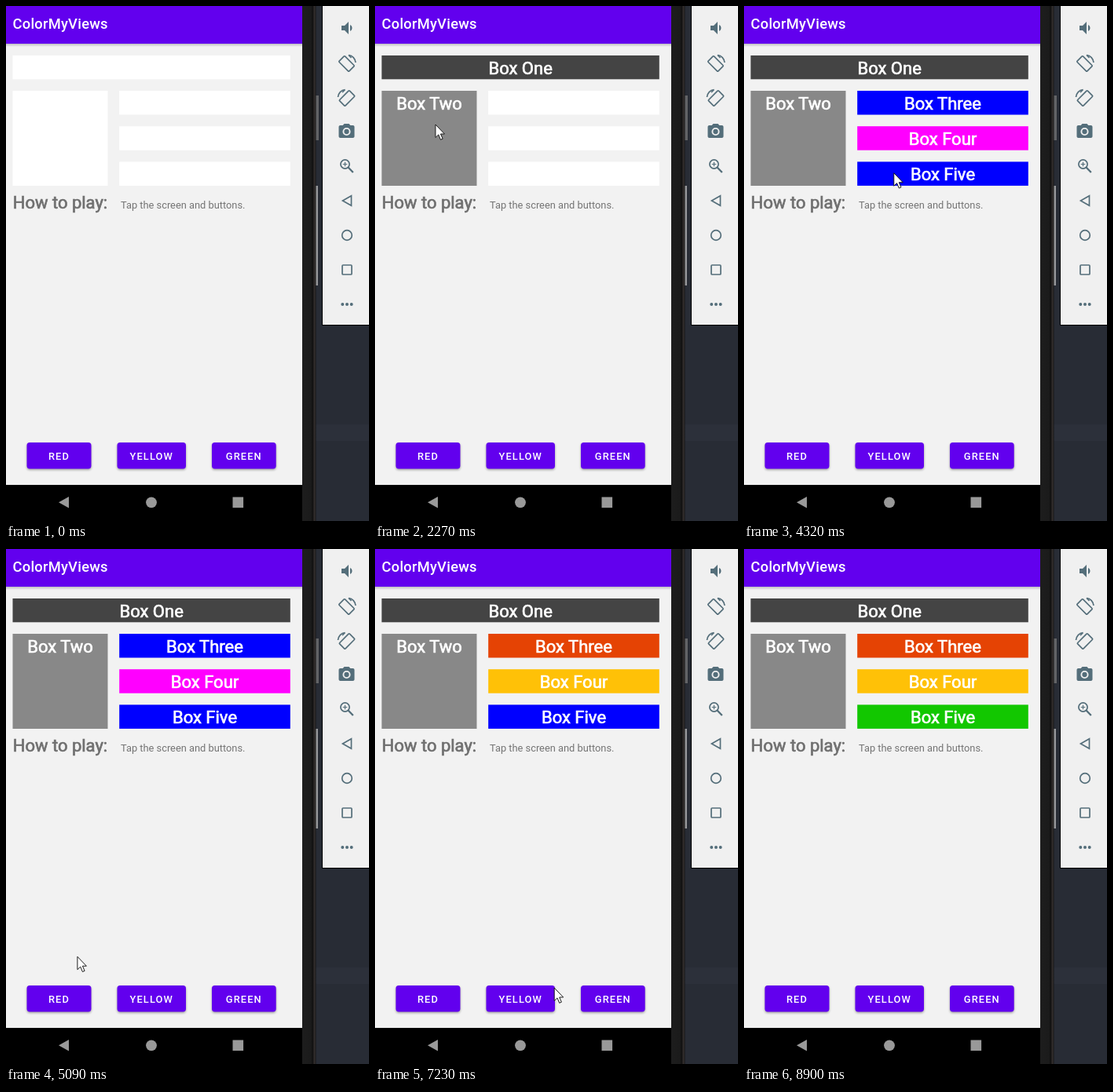
Animation, 462 px wide and 656 px high, one loop 9.31 s. Source, as an HTML page:

```html
<!DOCTYPE html>
<html lang="en">
<head>
<meta charset="utf-8">
<title>ColorMyViews</title>
<style>
  html, body { margin: 0; width: 100%; height: 100%; overflow: hidden; background: #282c35; }
  svg { display: block; width: 100vw; height: 100vh; font-family: Roboto, sans-serif; }
  .big { font-size: 22px; stroke-width: .7; }
  .label { fill: #fff; stroke: #fff; text-anchor: middle; }
  .caps { font-size: 12.83px; font-weight: 500; letter-spacing: 1.146px; fill: #fff; text-anchor: middle; }
  .line { fill: none; stroke: #546e7a; stroke-width: 1.7; }
  .solid { fill: #546e7a; }
</style>
</head>
<body>
<svg id="stage" viewBox="0 0 462 656">
  <defs>
    <linearGradient id="barShade" x2="0" y2="1">
      <stop offset="0" stop-color="#bdbdc2"/><stop offset="1" stop-color="#f2f2f2"/>
    </linearGradient>
    <linearGradient id="bezel">
      <stop offset="0" stop-color="#1d1d1d"/><stop offset=".65" stop-color="#1b1b1b"/>
      <stop offset=".75" stop-color="#0e0e0e"/><stop offset=".9" stop-color="#35302f"/>
      <stop offset="1" stop-color="#151515"/>
    </linearGradient>
    <filter id="soft" x="-20%" y="-40%" width="140%" height="190%"><feGaussianBlur stdDeviation="1.5"/></filter>
  </defs>

  <!-- editor behind the emulator -->
  <rect width="462" height="656" fill="#282c35"/>
  <rect x="394" y="533" width="68" height="21" fill="#2c303a"/>
  <rect x="394" y="114" width="4" height="57" fill="#626366"/>
  <rect x="394" y="229" width="3" height="127" fill="#96979a"/>

  <!-- phone -->
  <rect x="377" width="17.5" height="656" fill="url(#bezel)"/>
  <rect width="377" height="656" fill="#f2f2f2"/>
  <rect y="48" width="377" height="4" fill="url(#barShade)"/>
  <rect width="377" height="48" fill="#6200ee"/>
  <text x="8.5" y="29.3" font-size="18.35" font-weight="500" letter-spacing=".23" fill="#fff">ColorMyViews</text>
  <g id="boxes"></g>
  <text class="big" x="8.7" y="258" fill="#6f6f6f" stroke="#6f6f6f">How to play:</text>
  <text x="146" y="258" font-size="12.83" fill="#747474">Tap the screen and buttons.</text>
  <g id="buttons"></g>
  <rect y="610" width="377" height="46" fill="#000"/>
  <g fill="#999">
    <path d="M67 632.3L80 625v14.6z"/>
    <circle cx="185" cy="632.3" r="6.9"/>
    <rect x="288.5" y="625.5" width="13.6" height="13.6"/>
  </g>

  <!-- emulator toolbar -->
  <path d="M402 0h60v407h-60z" fill="#000"/>
  <path d="M403 0h59v406h-59z" fill="#f0f0f0"/>
  <g transform="translate(422 16)" class="solid">
    <path d="M5 9v6h4l5 5V4L9 9z"/>
    <path d="M16 8c1.5.7 2.5 2.200 2.500 4s-1 3.300-2.500 4z"/>
  </g>
  <g id="turn" class="line">
    <rect x="-9" y="-5.2" width="18" height="10.400" rx="1" transform="translate(433.500 73.500) rotate(45)"/>
    <path d="M436 62.500c5 .5 8.500 4.500 9 9.500M436 62.500l3.500 3.500"/>
  </g>
  <use href="#turn" transform="translate(867.500 44) scale(-1 1)"/>
  <g transform="translate(421.500 148)">
    <path class="solid" d="M9 2L7.200 4H4c-1.100 0-2 .9-2 2v12c0 1.100.9 2 2 2h16c1.100 0 2-.9 2-2V6c0-1.100-.9-2-2-2h-3.200L15 2z"/>
    <circle cx="12" cy="12" r="4.100" class="solid" stroke="#f0f0f0" stroke-width="1.900"/>
  </g>
  <g class="line">
    <circle cx="431.500" cy="201.500" r="5.600"/>
    <path d="M435.500 205.500l6.300 6.500" stroke-width="2.300"/>
    <path d="M428.700 201.500h5.600M431.500 198.700v5.600" stroke-width="1.200"/>
    <path d="M428.500 248l11-6.200v12.400z"/>
    <circle cx="434" cy="292" r="6.300"/>
    <rect x="428" y="330" width="12" height="12" rx="1"/>
  </g>
  <g class="solid">
    <circle cx="428.300" cy="380" r="2"/><circle cx="434" cy="380" r="2"/><circle cx="439.700" cy="380" r="2"/>
  </g>

  <path id="cursor" d="M0 0V16.500l3.800-3.600 2.700 6.400 2.700-1.200-2.700-6.100h5z" fill="#fff" stroke="#111" stroke-width=".95"/>
</svg>

<script>
const LOOP = 9310;
const $ = id => document.getElementById(id);

function add(parent, tag, attrs, text) {
  const el = document.createElementNS('http://www.w3.org/2000/svg', tag);
  for (const key in attrs) el.setAttribute(key, attrs[key]);
  if (text) el.textContent = text;
  return parent.appendChild(el);
}

// Each box lists its colour changes as [time, colour].
const boxes = [
  { name: 'Box One', x: 8.5, y: 63, w: 353.3, h: 30.3, fills: [[1380, '#444']] },
  { name: 'Box Two', x: 8.5, y: 108, w: 121, h: 121, fills: [[2200, '#888']] },
  { name: 'Box Three', x: 144.2, y: 108, w: 217.6, h: 30.5, fills: [[2950, '#00f'], [5840, '#e54304']] },
  { name: 'Box Four', x: 144.2, y: 153.2, w: 217.6, h: 30.5, fills: [[3710, '#f0f'], [6810, '#ffc107']] },
  { name: 'Box Five', x: 144.2, y: 198.4, w: 217.6, h: 30.5, fills: [[4180, '#00f'], [7780, '#12c700']] }
];

for (const b of boxes) {
  b.rect = add($('boxes'), 'rect', { x: b.x, y: b.y, width: b.w, height: b.h });
  b.label = add($('boxes'), 'text', { class: 'big label', x: b.x + b.w / 2, y: b.y + 23.8 }, b.name);
}

const buttons = [
  { name: 'RED', x: 26.5, w: 82, press: 5770 },
  { name: 'YELLOW', x: 141.500, w: 87.5, press: 6740 },
  { name: 'GREEN', x: 262, w: 81.7, press: 7710 }
];

for (const b of buttons) {
  const shape = { x: b.x, y: 556, width: b.w, height: 33.5, rx: 3.7 };
  const g = $('buttons');
  b.shadow = add(g, 'rect', { ...shape, fill: '#000', filter: 'url(#soft)' });
  add(g, 'rect', { ...shape, fill: '#6200ee' });
  add(add(g, 'clipPath', { id: 'clip' + b.name }), 'rect', shape);
  b.ripple = add(g, 'circle', { fill: '#fff', 'clip-path': `url(#clip${b.name})` });
  add(g, 'text', { class: 'caps', x: b.x + b.w / 2, y: 577.6 }, b.name);
}

// Pointer path as [time, x, y]; a repeated place is a rest.
const path = [
  [70, 442, 638], [380, 235, 335], [700, 44, 132], [970, 52, 101],
  [1180, 58, 82], [1400, 58, 82], [2000, 77, 151], [2400, 77, 151],
  [2800, 201, 122], [3010, 201, 122], [3500, 198, 173], [3740, 197, 174],
  [4040, 191, 212], [4300, 191, 212], [4800, 126, 420], [5090, 91, 519],
  [5440, 77, 566], [5900, 77, 566], [6120, 107, 556], [6610, 188, 567],
  [6960, 188, 567], [7230, 228, 559], [7510, 292, 568], [7960, 292, 568],
  [8620, 388, 598], [8900, 428, 638]
];

function slope(i, k) {
  const a = path[i - 1], b = path[i], c = path[i + 1];
  if (!a || !c || (b[k] - a[k]) * (c[k] - b[k]) <= 0) return 0;
  return (c[k] - a[k]) / (c[0] - a[0]);
}

function pointer(t) {
  let i = 0;
  while (i < path.length - 2 && t >= path[i + 1][0]) i++;
  const p = path[i], q = path[i + 1], d = q[0] - p[0];
  const u = Math.min(1, Math.max(0, (t - p[0]) / d)), v = 1 - u;
  return [1, 2].map(k =>
    p[k] * v * v * (1 + 2 * u) + q[k] * u * u * (3 - 2 * u) +
    d * u * v * (slope(i, k) * v - slope(i + 1, k) * u));
}

function draw(t) {
  for (const b of boxes) {
    const past = b.fills.filter(([at]) => t >= at);
    b.rect.setAttribute('fill', past.length ? past[past.length - 1][1] : '#fff');
    b.label.setAttribute('visibility', past.length ? 'visible' : 'hidden');
  }
  for (const b of buttons) {
    const u = (t - b.press) / 350, on = u >= 0 && u < 1;
    const lift = on ? Math.sin(Math.PI * u) : 0;
    b.shadow.setAttribute('transform', `translate(0 ${1.5 + 2 * lift})`);
    b.shadow.setAttribute('opacity', .34 + .1 * lift);
    const [x, y] = pointer(b.press);
    b.ripple.setAttribute('cx', x);
    b.ripple.setAttribute('cy', y);
    b.ripple.setAttribute('r', on ? 12 + 85 * u : 0);
    b.ripple.setAttribute('opacity', on ? .22 * (1 - u) : 0);
  }
  const [x, y] = pointer(t);
  $('cursor').setAttribute('transform', `translate(${x.toFixed(2)} ${y.toFixed(2)})`);
  $('cursor').setAttribute('visibility', t >= 70 && t < 8900 ? 'visible' : 'hidden');
}

const start = performance.now();
function tick() {
  draw((performance.now() - start) % LOOP);
  requestAnimationFrame(tick);
}
tick();
</script>
</body>
</html>
```
